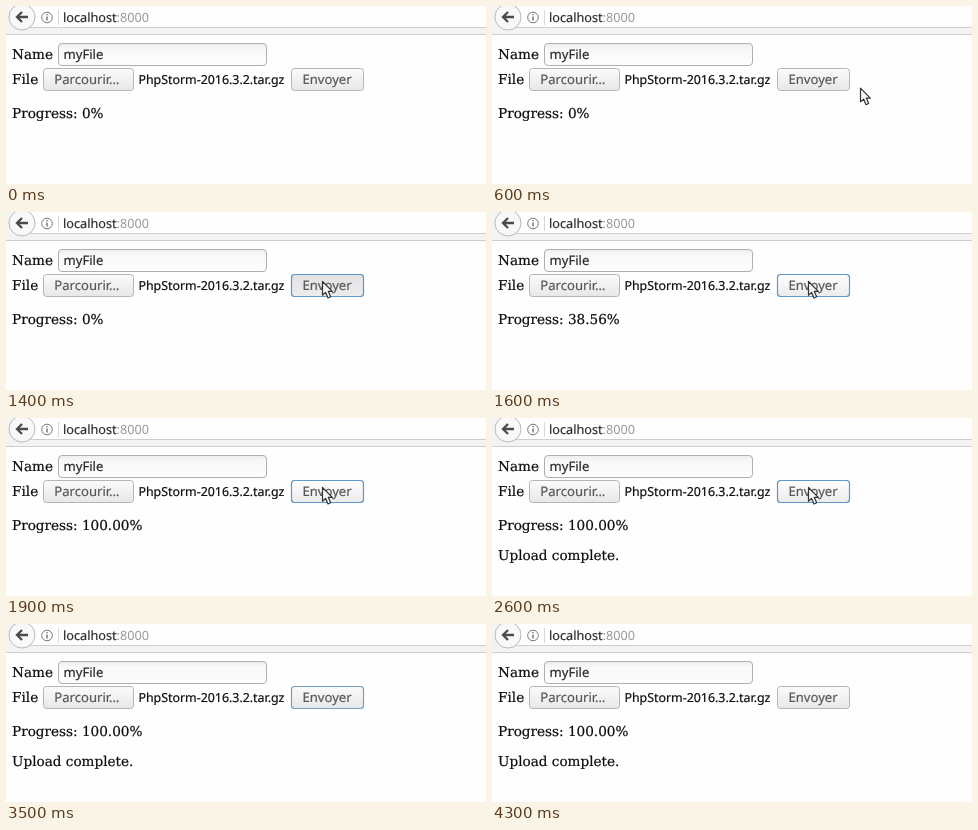
Animation, 480 px wide and 178 px high, one loop 4.9 s. Source, as an HTML page:

```html
<!DOCTYPE html>
<html lang="fr">
<head>
<meta charset="utf-8">
<title>Upload progress</title>
<style>
  html, body { margin: 0; width: 100%; height: 100%; overflow: hidden; background: #fefefe; }
  svg { display: block; width: 100%; height: 100%; }
  text { text-rendering: geometricPrecision; stroke-width: .2px; }
  .page { font: 13.6px "DejaVu Serif", serif; fill: #0c0c0c; stroke: #0c0c0c; }
  .ui { font: 13.1px "Noto Sans", "Open Sans", sans-serif; fill: #2c2c2c; stroke: #2c2c2c; }
  .label { fill: #585858; stroke: #585858; }
  .file { font-size: 12.4px; fill: #0c0c0c; stroke: #0c0c0c; }
  .address { font-size: 12.7px; }
  .port { fill: #999; stroke: none; }
</style>
</head>
<body>
<svg viewBox="0 0 480 178">
  <defs>
    <linearGradient id="face" x2="0" y2="1">
      <stop stop-color="#fbfbfb"/><stop offset="1" stop-color="#e7e7e7"/>
    </linearGradient>
    <linearGradient id="hover" x2="0" y2="1">
      <stop stop-color="#fefefe"/><stop offset="1" stop-color="#ebebeb"/>
    </linearGradient>
    <linearGradient id="pressed" x2="0" y2="1">
      <stop stop-color="#e3e3e3"/><stop offset="1" stop-color="#ececec"/>
    </linearGradient>
    <linearGradient id="field" x2="0" y2="1">
      <stop stop-color="#ededf0"/><stop offset=".25" stop-color="#f8f8fa"/><stop offset="1" stop-color="#fdfdfd"/>
    </linearGradient>
  </defs>

  <rect width="480" height="178" fill="#fefefe"/>
  <rect width="480" height="28" fill="#f4f3f3"/>
  <path d="M0 28.5H480" stroke="#cfcdcd"/>
  <path d="M16 -2H482V21.5H16Z" fill="#fefefe" stroke="#d0cecd"/>
  <circle cx="16" cy="11" r="13" fill="#f8f8f8" stroke="#bbb9b8"/>
  <path d="M22 11H11.5M16 6L11 11L16 16" fill="none" stroke="#4b4b4b" stroke-width="2.3"/>
  <circle cx="41" cy="11.5" r="5.3" fill="none" stroke="#777"/>
  <path d="M41 10.5V14.5M41 8V9.3" stroke="#666" stroke-width="1.3"/>
  <path d="M52.5 4V19" stroke="#d8d8d8"/>
  <text class="ui address" x="57" y="16">localhost<tspan class="port">:8000</tspan></text>

  <g class="page">
    <text x="6" y="53">Name</text>
    <text x="6" y="78">File</text>
    <text x="6" y="112" id="progress">Progress: 0%</text>
    <text x="6" y="142" id="complete">Upload complete.</text>
  </g>

  <rect x="52.5" y="37.5" width="208" height="22" rx="3.5" fill="url(#field)" stroke="#b0aeae"/>
  <text class="ui" x="57.5" y="53">myFile</text>

  <rect x="37.5" y="62.5" width="90" height="22" rx="3" fill="url(#face)" stroke="#b6b5b4"/>
  <text class="ui label" x="48.3" y="78">Parcourir…</text>
  <text class="ui file" x="132.4" y="78">PhpStorm-2016.3.2.tar.gz</text>

  <rect id="send" x="285.5" y="62.5" width="72" height="22" rx="3" stroke="#b6b5b4"/>
  <rect id="focus" x="285.5" y="62.5" width="72" height="22" rx="3" fill="none" stroke="#5d9acb" stroke-width="1.2"/>
  <text class="ui label" x="296.5" y="78">Envoyer</text>

  <path id="cursor" d="M.5 .5V14.2L3.6 11.4L6 17L8.7 15.8L6.3 10.4H10.3Z"
        fill="#f6f6f6" stroke="#333" stroke-width="1.2" stroke-linejoin="round"/>
</svg>
<script>
  const LOOP = 4900, STEP = 100;
  const $ = id => document.getElementById(id);

  // Pointer positions: [time, x, y]
  const pointerPath = [
    [500, 469, 113], [600, 368, 81.7], [700, 343, 75], [800, 327, 71],
    [900, 319, 69.5], [1000, 316, 69], [3100, 316, 69],
    [3200, 342, 88], [3300, 408, 125]
  ];

  function pointerAt(t) {
    if (t < 500 || t >= 3400) return null;
    const next = pointerPath.findIndex(p => p[0] > t);
    if (next < 0) return pointerPath[pointerPath.length - 1].slice(1);
    const [t0, x0, y0] = pointerPath[next - 1], [t1, x1, y1] = pointerPath[next];
    const k = (t - t0) / (t1 - t0);
    return [x0 + (x1 - x0) * k, y0 + (y1 - y0) * k];
  }

  function show(el, visible) {
    el.setAttribute("visibility", visible ? "visible" : "hidden");
  }

  function render(time) {
    const t = Math.floor(time % LOOP / STEP) * STEP;

    const pos = pointerAt(t);
    show($("cursor"), pos);
    if (pos) $("cursor").setAttribute("transform", `translate(${pos})`);

    const over = pos && pos[0] < 358 && pos[1] < 85;
    const face = t === 1400 ? "pressed" : over ? "hover" : "face";
    $("send").setAttribute("fill", `url(#${face})`);

    const fade = Math.min(1, Math.max(0, (4300 - t) / 400));
    $("focus").setAttribute("opacity", t < 1400 ? 0 : fade * (over ? 1 : 0.75));

    const done = Math.min(1, Math.max(0, (t - 1400) / 500));
    const percent = done ? (100 * done ** 1.04).toFixed(2) : "0";
    $("progress").textContent = `Progress: ${percent}%`;
    show($("complete"), t >= 2600);
  }

  const start = performance.now();
  (function tick() {
    render(performance.now() - start);
    requestAnimationFrame(tick);
  })();
</script>
</body>
</html>
```
